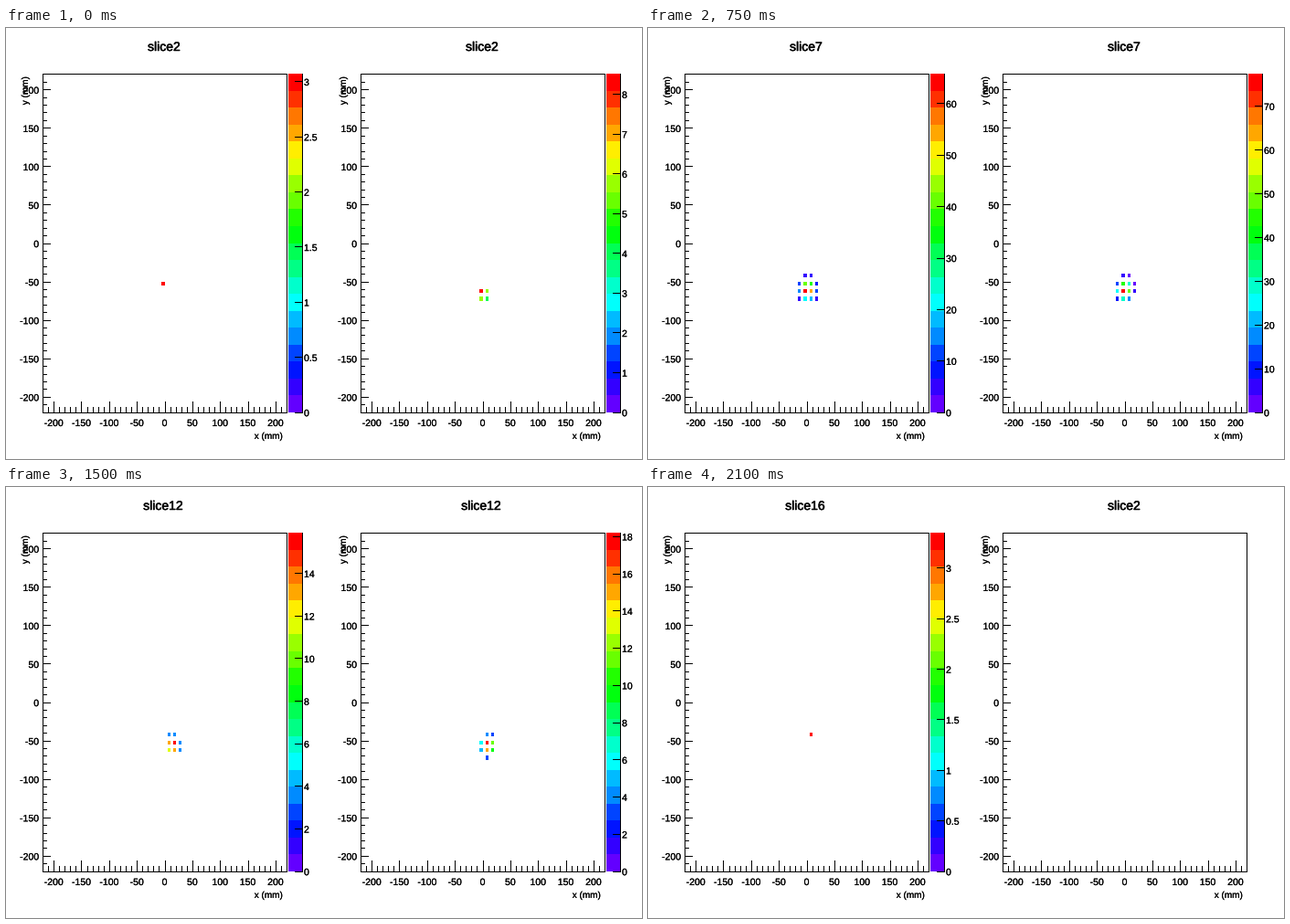
A matplotlib script for the animation above (2250 ms loop, 696 by 472 pixels).

```python
import colorsys
import math

import matplotlib.pyplot as plt
import numpy as np
from matplotlib.animation import FuncAnimation
from matplotlib.patches import Rectangle
from matplotlib.patheffects import withStroke

WIDTH, HEIGHT, DPI = 696, 472, 100
FRAMES, INTERVAL = 15, 150
LEFT, RIGHT, TOP, BOTTOM = 40, 307, 50, 421
AXIS_TOP, AXIS_BOTTOM = 50.4, 420.6
PANEL_SHIFT = 348
LEVELS = 20

FIRST_SLICE, LAST_SLICES = 2, (16, 14)
MIN_ENERGY = 2.8  # weaker cells stay empty
SPREAD = 1.3      # width of the shower, in cells squared

# Key points of each shower: slice, peak energy, column and row of its centre.
TRACKS = (
    np.array([(2, 3.066, 0, 1), (4, 45.87, 0.35, 1.85), (6, 96.8, 0.35, 1.75),
              (9, 30.24, 0.52, 1.8), (12, 15.88, 1.6, 1.4), (14, 3.36, 1, 1.55),
              (15, 3.342, 1, 0)]),
    np.array([(2, 8.5, 0.25, 2.25), (4, 55.7, 0.3, 1.95), (6, 110.4, 0.2, 1.9),
              (9, 37.86, 0.2, 1.75), (12, 18.17, 1.2, 1.4), (14, 8.53, 1.75, 1.35)]),
)


def shower(side, number):
    """Peak energy and the energies of all lit cells in one slice."""
    keys, peaks, cols, rows = TRACKS[side].T
    peak = math.exp(np.interp(number, keys, np.log(peaks)))
    x, y = np.interp(number, keys, cols), np.interp(number, keys, rows)
    glow = {(c, r): math.exp(-((c - x) ** 2 + (r - y) ** 2) / SPREAD)
            for c in range(-2, 5) for r in range(5)}
    scale = peak / max(glow.values())
    return peak, {cell: g * scale for cell, g in glow.items()
                  if g * scale > MIN_ENERGY}


def level_color(level):
    step = int((level + 0.99) * 50 / LEVELS)
    return colorsys.hls_to_rgb((280 - 5.6 * (step + 1)) / 360, 0.5, 1)


def tick_step(peak):
    rough = peak / 10
    power = 10 ** math.floor(math.log10(rough))
    return next(m * power for m in (1, 2, 5, 10) if m * power >= rough)


def px(mm):
    return LEFT + (mm + 220) * (RIGHT - LEFT) / 440


def py(mm):
    return AXIS_BOTTOM - (mm + 220) * (AXIS_BOTTOM - AXIS_TOP) / 440


fig = plt.figure(figsize=(WIDTH / DPI, HEIGHT / DPI), dpi=DPI, facecolor="white")
ax = fig.add_axes([0, 0, 1, 1])
ax.set_xlim(0, WIDTH)
ax.set_ylim(HEIGHT, 0)
ax.axis("off")


def box(x0, y0, x1, y1, color="black"):
    return ax.add_patch(Rectangle((x0, y0), x1 - x0, y1 - y0, facecolor=color,
                                  linewidth=0, antialiased=False))


def label(x, y, text, size=10.5, ha="center", va="baseline", weight=0.12, **kw):
    return ax.text(x, y, text, fontsize=size * 72 / DPI, ha=ha, va=va,
                   family="Liberation Sans", color="black",
                   path_effects=[withStroke(linewidth=weight, foreground="black")],
                   **kw)


def draw_axes(shift):
    x0, x1 = LEFT + shift, RIGHT + shift
    box(x0, TOP, x1 + 1, TOP + 1)
    box(x0, BOTTOM, x1 + 1, BOTTOM + 1)
    box(x0, TOP, x0 + 1, BOTTOM + 1)
    box(x1, TOP, x1 + 1, BOTTOM + 1)
    for mm in range(-210, 211, 10):
        major = mm % 50 == 0
        x, y = round(px(mm)) + shift, round(py(mm))
        box(x, BOTTOM - (12 if major else 6), x + 1, BOTTOM)
        box(x0, y, x0 + (9 if major else 5), y + 1)
        if major:
            label(px(mm) + shift, 436, str(mm))
            label(x0 - 4, py(mm) + 4.6, str(mm), ha="right")
    label(x0 + 263, 450, "x (mm)", 10, ha="right")
    label(x0 - 14, 53, "y (mm)", 10, ha="right", va="top", rotation=90)


def draw_scale(shift, peak):
    x = 309 + shift
    edges = [round(BOTTOM - (BOTTOM - TOP) * i / LEVELS) for i in range(LEVELS + 1)]
    parts = [box(x, edges[i + 1], x + 16, edges[i], level_color(i))
             for i in range(LEVELS)]
    parts.append(box(x + 15, TOP, x + 16, BOTTOM + 1))
    step = tick_step(peak)
    for i in range(int(peak / step) + 1):
        y = AXIS_BOTTOM - (AXIS_BOTTOM - AXIS_TOP) * i * step / peak
        parts.append(box(x + 7, round(y), x + 16, round(y) + 1))
        parts.append(label(x + 17, y + 4.6, f"{i * step:g}", ha="left"))
    return parts


def draw_cells(shift, cells, peak):
    parts = []
    for (col, row), energy in cells.items():
        x, y = -5 + 10 * col, -40 - 10 * row
        color = level_color(int(energy / peak * (LEVELS - 0.5)))
        parts.append(box(round(px(x)) + shift, round(py(y)),
                         round(px(x + 5)) + shift, round(py(y - 5)), color))
    return parts


for offset in (0, PANEL_SHIFT):
    draw_axes(offset)

moving = []


def update(frame):
    for part in moving:
        part.remove()
    moving.clear()
    for side, last in enumerate(LAST_SLICES):
        shift = side * PANEL_SHIFT
        number = frame + FIRST_SLICE
        active = number <= last
        if not active:
            number = FIRST_SLICE
        center = 173 if number < 10 else 172
        moving.append(label(center + shift, 25, f"slice{number}", 14, weight=0.35))
        if active:
            peak, cells = shower(side, number)
            moving.extend(draw_scale(shift, peak))
            moving.extend(draw_cells(shift, cells, peak))
    return moving


def reset():
    return update(0)


animation = FuncAnimation(fig, update, frames=FRAMES, init_func=reset,
                          interval=INTERVAL, repeat=True, repeat_delay=0)
plt.show()
```
